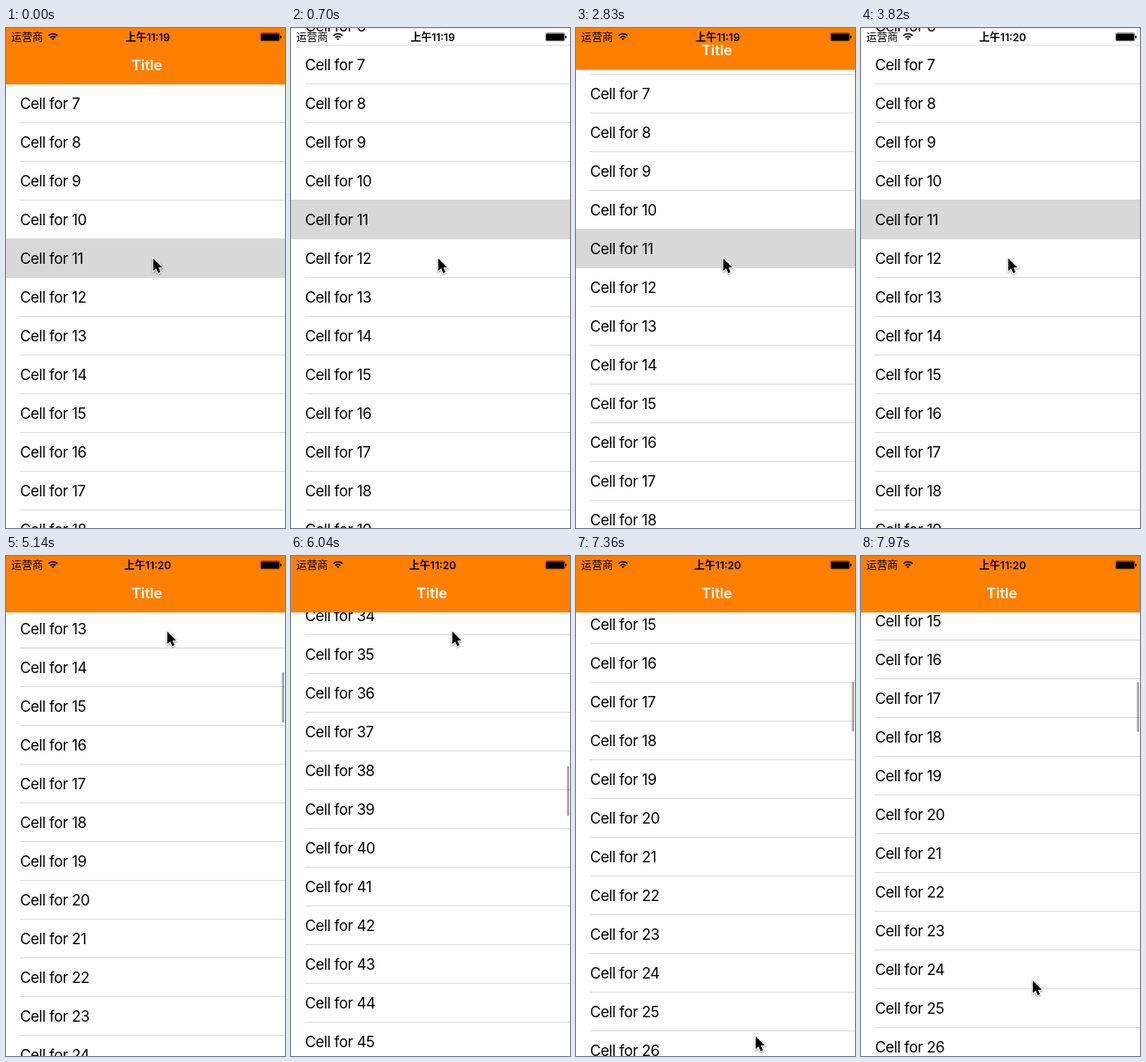
An HTML page with a canvas that plays this animation: 318 by 568 pixels, repeating every 8000 ms.

```html
<!DOCTYPE html>
<html lang="zh">
<head>
<meta charset="utf-8">
<style>
  html, body { margin: 0; width: 100%; height: 100%; overflow: hidden; background: #fff; }
  canvas { display: block; }
</style>
</head>
<body>
<canvas id="stage" width="318" height="568"></canvas>
<script>
const ctx = document.getElementById('stage').getContext('2d');
const W = 318, H = 568, LOOP = 8000, ROW = 44, FIRST = 7;
const ORANGE = '#ff8000', SELECTED = '#d8d8d8', LINE = '#dddddd';
const FONT = 'Inter, "Noto Sans CJK SC", "Noto Sans CJK", sans-serif';
const STEP = 88, SCROLL_START = 4710;
const ARROW = new Path2D('M0 0V14.2L3.3 11.2L5.7 16.6L8.2 15.5L5.9 10.3H10.3Z');

// Finger drags (seconds after scrolling starts); glide is the coasting distance after release
const DRAGS = [
  { start: 0, length: .4014, power: 3, x: 183, y: 85, glide: 1225.7 },
  { start: 1.36, length: .538, power: 1.2, x: 204, y: 545, glide: -518.9 },
  { start: 2.99, length: .266, power: 1.5, x: 195, y: 481.6, glide: 0 },
];

const clamp = (v, lo, hi) => Math.max(lo, Math.min(hi, v));

// Bar movement in three steps, complete at `end`
function slide(t, end) {
  const p = clamp(Math.floor((t - end) / STEP + .05) + 3, 0, 3) / 3;
  return p * p * (3 - 2 * p);
}

function scrollState(t) {
  let scroll = 0, x = 167, y = 261;
  DRAGS.forEach((d, i) => {
    if (t < d.start) return;
    const u = Math.min(1, (t - d.start) / d.length) ** d.power;
    const next = DRAGS[i + 1] ? DRAGS[i + 1].start : Infinity;
    const coast = Math.max(0, Math.min(t, next) - d.start - d.length);
    scroll += (y - d.y) * u + d.glide * (1 - Math.exp(-2 * coast));
    x += (d.x - x) * u;
    y += (d.y - y) * u;
  });
  return { scroll, x, y };
}

function rect(color, x, y, w, h) {
  ctx.fillStyle = color;
  ctx.fillRect(x, y, w, h);
}

function text(str, x, y, size, { weight = 400, color = '#000', align = 'left', spacing = 0 } = {}) {
  ctx.font = `${weight} ${size}px ${FONT}`;
  ctx.letterSpacing = spacing + 'px';
  ctx.textAlign = align;
  ctx.fillStyle = color;
  ctx.fillText(str, x, y);
}

function pill(color, x, y, w, h, r) {
  ctx.fillStyle = color;
  ctx.beginPath();
  ctx.roundRect(x, y, w, h, r);
  ctx.fill();
}

function drawList(shift, selected) {
  const from = Math.max(0, FIRST + Math.floor((shift - 64) / ROW));
  for (let n = from; n < from + 15; n++) {
    const top = 64 + (n - FIRST) * ROW - shift;
    rect(LINE, 16, top + 43, W - 16, 1);
    if (n === selected) rect(SELECTED, 0, top - 1, W, ROW + 1);
    text('Cell for ' + n, 16, top + 28, 17, { spacing: -.4 });
  }
}

function drawStatus(clock) {
  text('运营商', 6, 14.5, 12);
  text(clock, 161.5, 14.5, 12, { weight: 600, align: 'center' });

  ctx.strokeStyle = '#000';
  ctx.lineWidth = 1.7;
  for (const r of [3.9, 7]) {
    ctx.beginPath();
    ctx.arc(53.5, 13.5, r, -Math.PI * .76, -Math.PI * .24);
    ctx.stroke();
  }
  ctx.fillStyle = '#000';
  ctx.beginPath();
  ctx.moveTo(53.5, 14);
  ctx.arc(53.5, 13.5, 2, -Math.PI * .76, -Math.PI * .24);
  ctx.fill();

  ctx.lineWidth = .6;
  ctx.beginPath();
  ctx.roundRect(290.3, 5.8, 21.6, 8.8, 1.6);
  ctx.stroke();
  pill('#000', 291, 6.5, 20.2, 7.4, 1);
  pill('#000', 312.5, 8.7, 1.5, 3, .7);
}

function drawCursor(x, y) {
  ctx.save();
  ctx.translate(x + .8, y + .8);
  ctx.shadowColor = 'rgba(0,0,0,.4)';
  ctx.shadowBlur = 2;
  ctx.shadowOffsetY = 1;
  ctx.strokeStyle = '#fff';
  ctx.lineWidth = 2;
  ctx.stroke(ARROW);
  ctx.shadowColor = 'transparent';
  ctx.fillStyle = '#000';
  ctx.fill(ARROW);
  ctx.restore();
}

function draw(t) {
  const hidden = slide(t, 700) - slide(t, 1940) + slide(t, 3010) - slide(t, 4080);
  const selected = t < 1600 ? 11 : t < 2740 ? 12 : t < 3910 ? 11 : 12;
  const tick = Math.floor((t - SCROLL_START + 12) / 88.1);
  const { scroll, x, y } = scrollState(tick * STEP / 1000);
  const barBottom = 64 * (1 - hidden);

  rect('#fff', 0, 0, W, H);
  drawList(Math.floor(scroll + .3) + Math.round(ROW * hidden), selected);
  if (tick >= 0) {
    pill('rgba(0,0,0,.36)', 314.5, 67 + (FIRST * ROW + scroll) * .1132, 2.5, 57, 1.25);
  }
  rect(ORANGE, 0, 0, W, barBottom);
  rect('rgba(0,0,0,.15)', 0, barBottom, W, .6);
  text('Title', 160.5, barBottom - 16, 16.5, { weight: 600, color: '#fff', align: 'center' });
  drawStatus(t < 3820 ? '上午11:19' : '上午11:20');
  drawCursor(x, y);
}

const began = performance.now();
function frame() {
  draw((performance.now() - began) % LOOP);
  requestAnimationFrame(frame);
}
frame();
</script>
</body>
</html>
```
